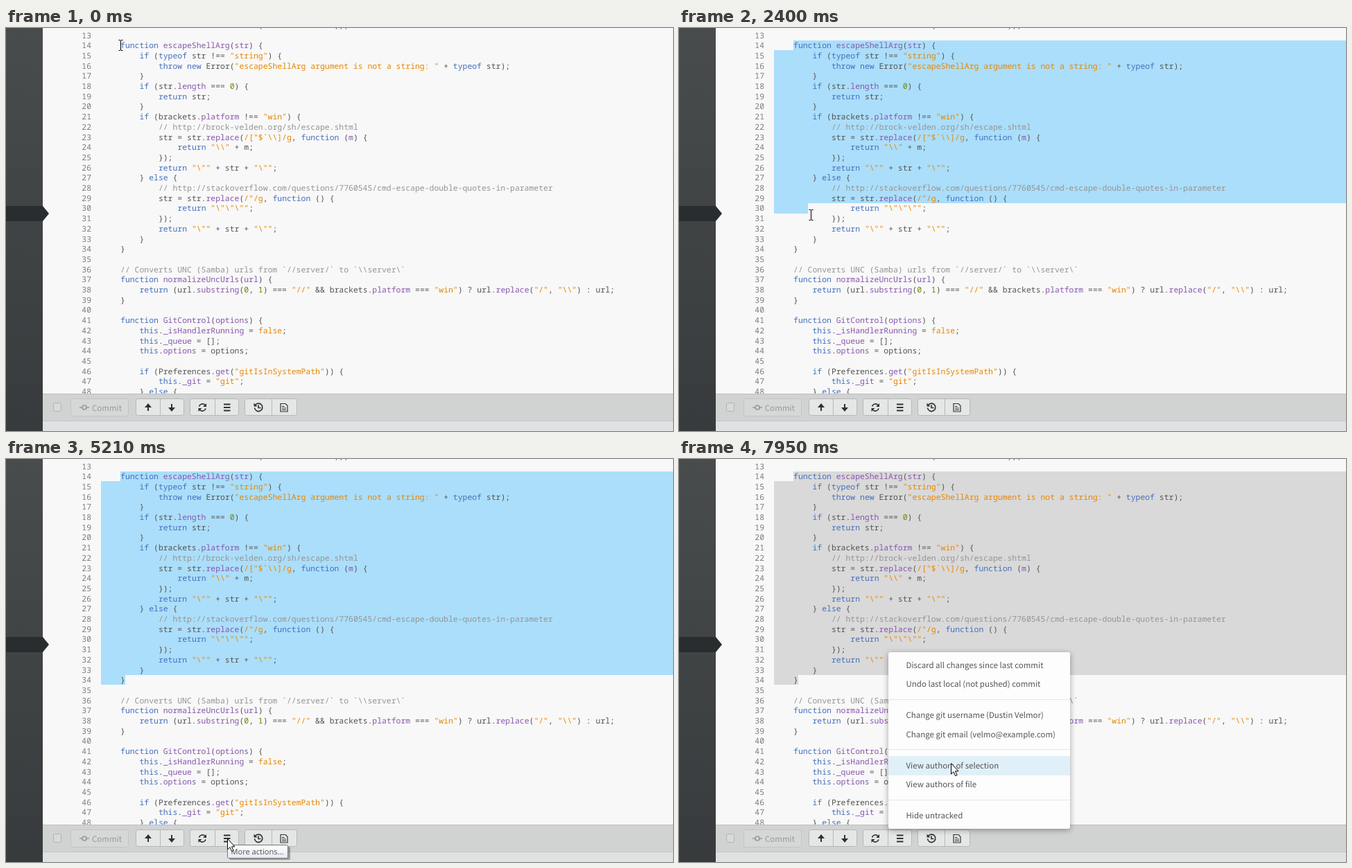
An HTML page for the animation above (8000 ms loop, 962x582 px).

```html
<!DOCTYPE html>
<html lang="en">
<head>
<meta charset="utf-8">
<title>Code editor with git menu</title>
<style>
  html, body { margin: 0; width: 100%; height: 100%; overflow: hidden; background: #f8f8f8; }
  svg { display: block; width: 962px; height: 582px; }
  text { text-rendering: geometricPrecision; }
  #lines { font-family: "Noto Sans Mono", "DejaVu Sans Mono", monospace; font-size: 11.43px; fill: #535353; }
  .num { text-anchor: end; fill: #7d7d7d; }
  .comment { fill: #949494; }
  .string { fill: #e88501; }
  .keyword { fill: #446fbd; }
  .name { fill: #8757ad; }
  .number { fill: #6d8600; }
  .ui { font-family: "Noto Sans CJK JP", "Noto Sans CJK SC", "Noto Sans", sans-serif; }
  #menu .frame { fill: #fdfdfd; filter: drop-shadow(0 2px 4px rgba(0, 0, 0, .35)); }
  #menu text { fill: #555; }
  .button { fill: #e5e7e6; stroke: #b5b8b7; }
  .icon { fill: none; stroke: #2f3233; stroke-width: 2; }
</style>
</head>
<body>
<svg viewBox="0 0 962 582">
  <defs>
    <linearGradient id="side" x2="0" y2="1">
      <stop stop-color="#484c4d"/><stop offset="1" stop-color="#373b3d"/>
    </linearGradient>
    <linearGradient id="tip" x2="0" y2="1">
      <stop stop-color="#fff"/><stop offset="1" stop-color="#e7e8f1"/>
    </linearGradient>
  </defs>
  <rect width="962" height="582" fill="#f8f8f8"/>
  <path id="selection"/>
  <g id="lines"></g>
  <path id="caret" d="M165.5 18v14" stroke="#000"/>

  <rect width="53" height="582" fill="url(#side)"/>
  <path d="M0 257H53L62 268L53 279H0z" fill="#2a2d2f"/>

  <rect x="53" y="528" width="909" height="54" fill="#d1d3d2"/>
  <path d="M53 528.5H962" stroke="#bcbfbe"/>
  <rect x="53" y="567" width="909" height="15" fill="#dfe2e2"/>
  <path d="M53 567.5H962" stroke="#c3c6c5"/>
  <rect x="68.5" y="541.5" width="11" height="12" rx="2" fill="#d8dad9" stroke="#b0b3b2"/>
  <rect x="93.5" y="535.5" width="83" height="25" rx="3" fill="#d6d8d7" stroke="#c2c5c4"/>
  <g fill="none" stroke="#979a99" stroke-width="1.7">
    <circle cx="113" cy="548" r="3"/><path d="M106 548h4m6 0h4"/>
  </g>
  <text id="commit" class="ui" x="124" y="553" fill="#979a99">Commit</text>
  <g class="button">
    <rect x="187.5" y="535.5" width="69" height="24" rx="3"/>
    <rect x="265.5" y="535.5" width="70" height="24" rx="3"/>
    <rect x="344.5" y="535.5" width="75" height="24" rx="3"/>
    <path d="M222.5 536v23M301.5 536v23M383.5 536v23"/>
  </g>
  <path id="pressed" d="M301.5 535.5h32a2 2 0 0 1 2 2v20a2 2 0 0 1 -2 2h-32z" fill="#c6c8c7" stroke="#a4a7a6"/>
  <g class="icon">
    <path d="M205 553v-8M239 543v8"/>
    <path d="M200 548l5 -6 5 6zM234 548l5 6 5 -6z" fill="#2f3233" stroke="none"/>
    <path d="M278.5 546.5a5 5 0 0 1 8.5 -2M288 549.500a5 5 0 0 1 -8.500 2" stroke-width="1.700"/>
    <path d="M289 542v5h-5zM277.500 554v-5h5z" fill="#2f3233" stroke="none"/>
    <path d="M314 543.500h9.500M314 548h9.500M314 552.500h9.500"/>
    <path d="M359.500 544.500a5.700 5.700 0 1 1 -1 4M364 544.500v4h3.500" stroke-width="1.700"/>
    <path d="M357.500 541.500v5h5z" fill="#2f3233" stroke="none"/>
    <path d="M396 542.500h7l3 3v8.500h-10zM398 546.500h3.500M398 549h6M398 551.500h6" stroke-width="1.200"/>
  </g>

  <g id="tooltip">
    <rect x="322" y="560" width="88" height="19" rx="2" fill="#000" opacity=".3"/>
    <rect x="319.500" y="557.500" width="87" height="19" rx="2" fill="url(#tip)" stroke="#767676"/>
    <text id="tipText" x="324.500" y="571" font-family="Open Sans, Noto Sans, sans-serif" fill="#505050">More actions...</text>
  </g>
  <g id="menu" class="ui">
    <rect class="frame" x="302" y="279" width="262" height="255" rx="3"/>
    <rect id="hover" x="302" width="262" height="27.500" fill="#e0f0f9"/>
    <path d="M302 347.500h262M302 419.500h262M302 492.500h262" stroke="#e6e6e6"/>
  </g>
  <path id="ibeam" d="M-3 -7.500h2.500M.5 -7.500h2.500M0 -7v14M-3 7.500h2.500M.5 7.500h2.500" stroke="#000" fill="none"/>
  <path id="arrow" d="M.5 .5V16l3.500 -3.300 2.600 5.900 2.500 -1.100 -2.600 -5.700H11z" fill="#fff" stroke="#000"/>
</svg>

<script type="text/plain" id="code">
    var controls = new ControlSet("main-control/"));

    function escapeShellArg(str) {
        if (typeof str !== "string") {
            throw new Error("escapeShellArg argument is not a string: " + typeof str);
        }
        if (str.length === 0) {
            return str;
        }
        if (brackets.platform !== "win") {
            // http://brock-velden.org/sh/escape.shtml
            str = str.replace(/["$`\\]/g, function (m) {
                return "\\" + m;
            });
            return "\"" + str + "\"";
        } else {
            // http://stackoverflow.com/questions/7760545/cmd-escape-double-quotes-in-parameter
            str = str.replace(/"/g, function () {
                return "\"\"\"";
            });
            return "\"" + str + "\"";
        }
    }

    // Converts UNC (Samba) urls from `//server/` to `\\server\`
    function normalizeUncUrls(url) {
        return (url.substring(0, 1) === "//" && brackets.platform === "win") ? url.replace("/", "\\") : url;
    }

    function GitControl(options) {
        this._isHandlerRunning = false;
        this._queue = [];
        this.options = options;

        if (Preferences.get("gitIsInSystemPath")) {
            this._git = "git";
        } else {
</script>
<script>
const $ = id => document.getElementById(id);
const LOOP = 8000, FIRST_LINE = 12, START_LINE = 14;
const LINE_H = 14.7, CHAR_W = 6.86, TEXT_X = 137.6, TOP = 17.6;
const lineTop = n => TOP + (n - START_LINE) * LINE_H;
const escapeXml = s => s.replace(/&/g, '&amp;').replace(/</g, '&lt;');

// Syntax colouring: the first group that matches names the token class.
const TOKEN = new RegExp([
  String.raw`(?<comment>^\s*\/\/.*)`,
  String.raw`(?<string>(?<=\()\/.+?\/g|"(?:\\.|[^"\\])*"|\bfalse\b)`,
  String.raw`(?<name>(?<=\.)\w+|(?<=function )\w+|(?<=function \w*\()\w+)`,
  String.raw`(?<keyword>\b(?:var|function|if|else|return|throw|new|typeof|this)\b)`,
  String.raw`(?<number>\b\d+\b)`
].join('|'), 'g');

function colour(line) {
  let html = '', end = 0;
  for (const m of line.matchAll(TOKEN)) {
    const type = Object.keys(m.groups).find(g => m.groups[g] !== undefined);
    html += escapeXml(line.slice(end, m.index)) + `<tspan class="${type}">${escapeXml(m[0])}</tspan>`;
    end = m.index + m[0].length;
  }
  return html + escapeXml(line.slice(end));
}

const code = $('code').textContent.replace(/^\n|\n$/g, '').split('\n');
$('lines').innerHTML = code.map((line, i) => {
  const n = FIRST_LINE + i, y = Math.round(lineTop(n) + 11.65);
  const indent = line.length - line.trimStart().length;
  return `<text class="num" x="123" y="${y}">${n}</text>` +
    `<text x="${TEXT_X + indent * CHAR_W}" y="${y}">${colour(line.trim())}</text>`;
}).join('');

const items = [
  ['Discard all changes since last commit', 298],
  ['Undo last local (not pushed) commit', 325],
  ['Change git username (Dustin Velmor)', 370],
  ['Change git email (velmo@example.com)', 397.5],
  ['View authors of selection', 443],
  ['View authors of file', 470],
  ['Hide untracked', 515]
];
$('menu').insertAdjacentHTML('beforeend',
  items.map(([label, y]) => `<text x="327.5" y="${y + 4}">${label}</text>`).join(''));

// Font size at which a sample has its natural width on the stage.
function sizeFor(node, sample, width) {
  const ctx = document.createElement('canvas').getContext('2d');
  ctx.font = '100px ' + getComputedStyle(node).fontFamily;
  return 100 * width / ctx.measureText(sample).width + 'px';
}
const uiSize = sizeFor($('menu'), items[0][0], 198);
$('menu').style.fontSize = $('commit').style.fontSize = uiSize;
$('tipText').style.fontSize = sizeFor($('tipText'), 'More actions...', 76);

// Pointer moves: [step, x, y] points, played in even steps from first to last.
const moves = [
  { first: 780, last: 3090, count: 18, points: [[-1, 165, 25], [3, 180, 89], [7, 185, 160],
    [12, 190, 270], [15, 184, 309.5], [17, 178, 318]] },
  { first: 3770, last: 5210, count: 12, points: [[-1, 178, 318], [0, 221, 332], [7, 319, 528], [10, 319, 548]] },
  { first: 6450, last: 7950, count: 12, points: [[-1, 319, 548], [1, 330, 564], [7, 368, 486], [11, 392, 439]] }
];

function pointer(move, t) {
  const { first, last, count, points } = move;
  const step = t < first ? -1 :
    Math.min(count - 1, Math.floor((t - first) / (last - first) * (count - 1) + 0.2));
  const next = points.findIndex(p => p[0] >= step);
  if (next < 0) return points.at(-1).slice(1);
  if (next === 0) return points[0].slice(1);
  const a = points[next - 1], b = points[next], f = (step - a[0]) / (b[0] - a[0]);
  return [1, 2].map(i => a[i] + (b[i] - a[i]) * f);
}

function selectionPath([x, y]) {
  const line = START_LINE + Math.floor((y - 3 - TOP) / LINE_H);
  const col = Math.min(code[line - FIRST_LINE].length, Math.round((x - 3 - TEXT_X) / CHAR_W));
  const endX = Math.round(TEXT_X + col * CHAR_W);
  const [a, b, c, d] = [START_LINE, START_LINE + 1, line, line + 1].map(n => Math.round(lineTop(n)));
  return `M165 ${a}H962V${c}H${endX}V${d}H137V${b}H165z`;
}

const show = (id, on) => { $(id).style.display = on ? '' : 'none'; };
const place = (id, x, y) => $(id).setAttribute('transform', `translate(${x} ${y})`);

function draw(t) {
  const move = moves.findLast(m => t >= m.first) || moves[0];
  const [x, y] = pointer(move, t).map(Math.round);
  const menuOpen = t >= 6040;

  show('caret', t < 500);
  show('selection', t >= moves[0].first);
  if (t >= moves[0].first) $('selection').setAttribute('d', selectionPath(pointer(moves[0], t)));
  $('selection').setAttribute('fill', menuOpen ? '#d9d9d9' : '#abdefa');

  const overText = y < 528 && !menuOpen;
  show('ibeam', overText);
  show('arrow', !overText);
  place('ibeam', x + 0.5, y);
  place('arrow', x, y);

  show('tooltip', t >= 5210 && t < 5890);
  show('pressed', t >= 5890 && t < 6450);
  show('menu', menuOpen);
  const scale = t < 6170 ? 0.996 : 1;
  $('menu').setAttribute('transform', `translate(302 534) scale(${scale}) translate(-302 -534)`);

  const hovered = items.find(item => Math.abs(y - item[1]) < 13.75);
  show('hover', hovered);
  if (hovered) $('hover').setAttribute('y', hovered[1] - 13.75);
}

const start = performance.now();
function tick() {
  draw((performance.now() - start) % LOOP);
  requestAnimationFrame(tick);
}
tick();
</script>
</body>
</html>
```
